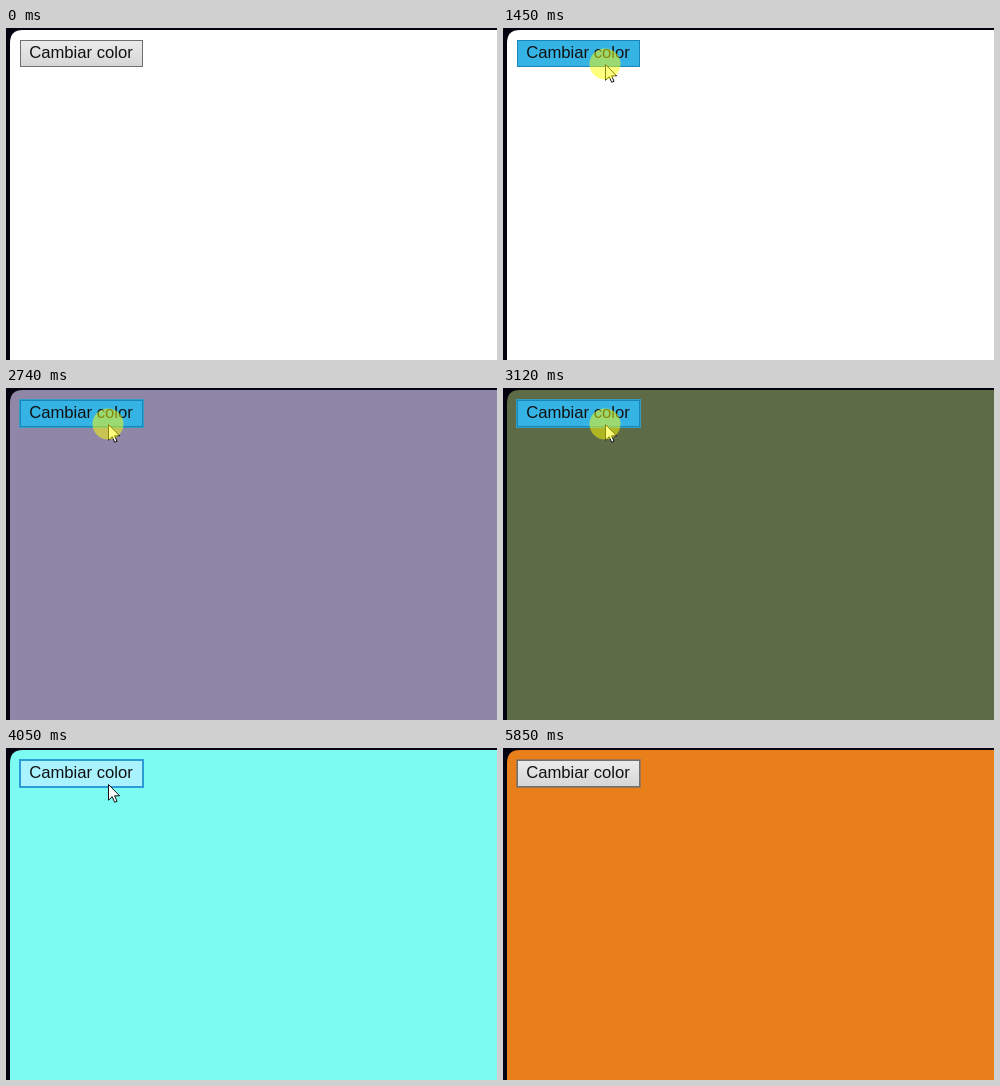
An HTML page for the animation above (6240 ms loop, 491x332 px).

```html
<!DOCTYPE html>
<html lang="es">
<head>
<meta charset="utf-8">
<title>Cambiar color</title>
<style>
  html, body { margin: 0; width: 100%; height: 100%; overflow: hidden; background: #05020f; }
  svg { display: block; width: 491px; height: 332px; }
  text { font: 16.67px "Liberation Sans", Arial, sans-serif; fill: #111; }
</style>
</head>
<body>
<svg viewBox="0 0 491 332">
  <defs>
    <linearGradient id="grey" x2="0" y2="1">
      <stop stop-color="#ebebeb"/>
      <stop offset="1" stop-color="#d6d6d6"/>
    </linearGradient>
  </defs>
  <rect width="491" height="332" fill="#05020f"/>
  <path id="page" d="M4 332V15Q4 2 17 2H491V332Z"/>
  <rect id="ring" x="13.5" y="11.5" width="124" height="28" fill="none"/>
  <rect id="button" x="14.5" y="12.5" width="122" height="26"/>
  <text x="23.2" y="30">Cambiar color</text>
  <g id="cursor">
    <path d="M.5 .5V16.2L4.2 12.7L6.7 18.3L9 17.3L6.6 11.8H11.6Z" fill="#fff" stroke="#111"/>
    <circle id="glow" r="15.5" fill="#ff0" fill-opacity=".5"/>
  </g>
</svg>
<script>
const LOOP = 6240;

// circle shown, button down, colour changed, circle hidden, new colour
const clicks = [
  [1430, 1450, 1530, 1530, '#b0713f'],
  [1850, 1870, 1930, 1930, '#549b0c'],
  [2240, 2240, 2350, 2350, '#8f86a8'],
  [2740, 2740, 2820, 2820, '#5d6c47'],
  [3100, 3120, 3220, 3220, '#9a8fc4'],
  [3500, 3520, 3620, 3620, '#73a37c'],
  [3950, 3970, 4050, 4050, '#7cfbf2'],
  [4410, 4410, 4490, 4490, '#a8a080'],
  [4850, 4850, 4930, 4950, '#fc9e7b'],
  [5270, 5270, 5330, 5350, '#e87f1a']
];

// time, x, y of the pointer tip
const route = [
  [400, 407, 324], [500, 375, 282], [620, 318, 230], [740, 248, 171],
  [860, 190, 121], [1010, 141, 76], [1090, 121, 57], [1170, 109, 43],
  [1270, 102, 36], [5480, 102, 36], [5560, 122, 56], [5640, 178, 108],
  [5740, 295, 210], [5850, 431, 328]
];

const looks = {
  idle: ['url(#grey)', '#707070', 'rgba(105,110,120,.55)'],
  hover: ['#a9f3fe', '#2d9cd6', '#2d9cd6'],
  down: ['#36b3e5', '#1687b8', '#2f9fc4']
};

const el = id => document.getElementById(id);
const [page, ring, button, cursor, glow] =
  ['page', 'ring', 'button', 'cursor', 'glow'].map(el);

function tipAt(t) {
  const i = route.findIndex(p => p[0] > t);
  if (i < 1) return null;
  const [a, b] = [route[i - 1], route[i]];
  const k = (t - a[0]) / (b[0] - a[0]);
  return [1, 2].map(n => Math.round(a[n] + (b[n] - a[n]) * k));
}

function draw(t) {
  const tip = tipAt(t);
  const down = clicks.some(c => t >= c[1] && t < c[2]);
  const lit = clicks.some(c => t >= c[0] && t < c[3]);
  const last = clicks.filter(c => t >= c[2]).pop();
  const over = tip && tip[0] < 137 && tip[1] < 39;
  const [fill, edge, halo] = looks[down ? 'down' : over ? 'hover' : 'idle'];

  page.setAttribute('fill', last ? last[4] : '#fff');
  button.setAttribute('fill', fill);
  button.setAttribute('stroke', edge);
  ring.setAttribute('stroke', last ? halo : 'none');
  glow.setAttribute('visibility', lit ? 'visible' : 'hidden');
  cursor.setAttribute('display', tip ? 'inline' : 'none');
  if (tip) cursor.setAttribute('transform', `translate(${tip})`);
}

const start = performance.now();
function tick() {
  draw((performance.now() - start) % LOOP);
  requestAnimationFrame(tick);
}
tick();
</script>
</body>
</html>
```
